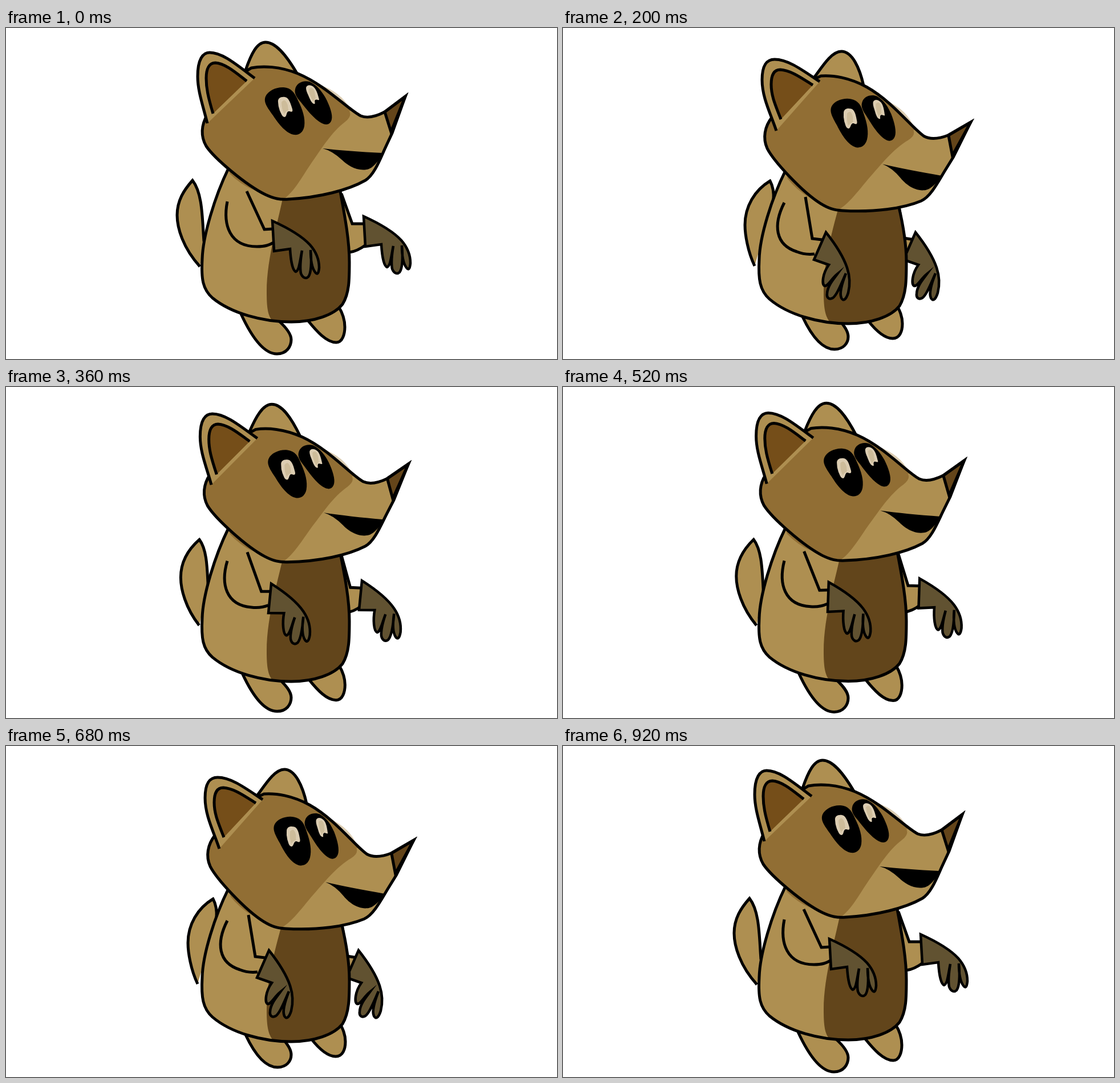
Recreate the animation shown at these times as an HTML page with a canvas. Size 966x580 px, loop 1 s.

```html
<!DOCTYPE html>
<html lang="en">
<head>
<meta charset="utf-8">
<title>Bobbing animal</title>
<style>
html, body { margin: 0; width: 100%; height: 100%; overflow: hidden; background: #fff; }
canvas { display: block; }
</style>
</head>
<body>
<canvas id="stage" width="966" height="580"></canvas>
<script>
const ctx = document.getElementById('stage').getContext('2d');
const FUR = '#ae8f51', SHADE = '#916e34', BELLY = '#62451b', EAR = '#754e19',
  HAND = '#615231', NOSE = '#64451a', GLINT = '#dccdb2', GLINT_DARK = '#cdbc9a';
const LINE = 5;

// Each pair holds the raised and the lowered shape of one part.
const parts = {
  tail: ['M340 418C310 385 300 350 300 328C300 302 312 284 327 267C345 290 344 335 347 374',
    'M336 417C324 392 319 362 319 345C319 313 336 284 363 268C368 277 370 287 369 302'],
  nearFoot: ['M412 501C430 540 452 571 475 571C492 571 500 558 500 546C500 534 488 522 478 513',
    'M420 506C436 540 455 563 476 563C492 563 500 552 500 541C500 532 494 524 488 516'],
  farFoot: ['M528 511C545 532 562 551 579 551C590 551 594 536 594 524C594 508 588 496 583 488',
    'M535 513C550 532 564 544 578 544C590 544 595 532 595 518C595 505 590 495 586 487'],
  body: ['M390 246C366 295 345 365 344 405C342 440 345 458 362 473C395 500 450 515 500 515C540 515 575 503 590 484C602 465 602 440 602 410C602 370 593 325 586 286',
    'M390 250C366 298 345 365 344 405C342 440 345 460 362 475C395 503 450 518 500 518C540 518 575 506 590 487C602 467 602 440 602 410C602 375 594 335 588 310'],
  belly: ['M487 288C480 330 457 400 457 462C457 490 459 505 468 514L620 530L620 270Z',
    'M487 300C478 335 457 400 457 464C457 492 460 508 470 517L620 530L620 270Z'],
  farArm: ['M588 290L607 343L630 343L631 380C620 388 612 392 602 393',
    'M588 304L597 368L616 371L608 390C600 398 590 400 580 400'],
  nearArm: ['M422 286L453 353L468 352M388 304C380 345 392 383 440 383C455 383 462 380 469 376',
    'M425 296L437 369L454 371M388 306C368 345 372 380 410 392C422 397 432 397 441 396'],
  hand: ['M467 338C500 353 522 368 533 380C547 396 549 410 549 420C548 432 545 432 542 428C536 420 534 404 534 389C536 410 535 430 530 436C526 440 520 438 517 430C515 420 517 402 519 390C515 410 514 425 508 427C502 425 499 405 498 387L470 391Z',
    'M461 358C480 382 492 402 498 420C504 438 503 452 500 464C496 477 491 479 488 473C484 464 489 448 496 430C487 450 480 468 473 473C466 477 462 472 463 465C464 452 473 442 481 431C470 440 465 452 459 452C453 450 455 430 466 415L440 406Z'],
  farEar: ['M420 74C430 45 440 25 455 25C472 25 490 45 511 81',
    'M441 86C453 70 470 41 488 41C507 41 520 70 527 101'],
  ear: ['M353 167C345 135 336 110 336 85C336 55 345 43 357 43C380 43 405 65 436 88',
    'M374 180C364 150 349 122 349 91C349 65 357 55 371 55C395 55 420 74 450 94'],
  earInner: ['M363 150C354 120 351 105 351 88C351 70 357 61 367 61C385 62 405 80 422 93',
    'M382 160C371 132 365 118 365 99C365 81 371 73 381 73C400 74 420 89 438 100']
};

const head = new Path2D('M353 152C342 170 341 190 351 207C365 228 420 275 455 292C470 299 480 301 495 300C550 297 600 284 630 267C645 258 655 232 664 212L677 184L700 120L664 147C645 157 632 158 622 154C600 143 560 100 512 80C480 67 450 66 430 70L420 76');
const mask = new Path2D('M640 120L602 146Q607 154 595 164C570 183 553 212 540 230C520 258 505 290 482 303L300 303L300 50L560 50Z');
const cheek = new Path2D('M548 99Q588 112 603 142Z');
const neck = new Path2D('M390 248L393 256Q410 273 434 284Z');
const eyes = new Path2D('M455 120C459 110 474 103 487 104C500 105 506 113 512 127C520 143 525 158 523 172C521 183 514 188 505 187C492 185 479 170 468 153C458 139 451 130 455 120ZM507 107C509 97 520 91 532 94C545 100 553 110 560 122C568 137 573 152 571 160C569 169 562 171 554 167C540 160 525 140 517 130C510 122 505 115 507 107Z');
const glints = new Path2D('M477 130C476 123 482 120 489 121C496 122 499 132 502 142C503 146 502 148 497 146C491 145 493 154 489 156C484 156 483 151 480 145Q477 137 477 130ZM526 105C527 99 535 99 540 104C545 109 547 118 549 125C549 128 545 124 542 126C540 129 543 132 541 133C536 133 533 125 530 118Q526 110 526 105Z');
const glintCores = new Path2D('M483 130Q489 121 494 135L495 144Q490 146 488 151Q483 143 483 130ZM531 107Q537 101 541 112L543 123Q540 125 539 129Q532 118 531 107Z');
const mouth = new Path2D('M555 211Q600 216 661 219C654 232 643 247 632 248C615 251 598 240 590 232Q572 215 555 211Z');
const nose = new Path2D('M664 147L700 120L675 182Z');

const NUM = /-?\d+/g;
function blend(name, p) {
  const [from, to] = parts[name];
  const ends = to.match(NUM);
  let i = 0;
  return new Path2D(from.replace(NUM, v => +v + (ends[i++] - v) * p));
}

function paint(path, fill, width = LINE) {
  if (fill) {
    ctx.fillStyle = fill;
    ctx.fill(path);
  }
  if (width) {
    ctx.lineWidth = width;
    ctx.stroke(path);
  }
}

function paintClipped(clip, path, fill) {
  ctx.save();
  ctx.clip(clip);
  paint(path, fill, 0);
  ctx.restore();
}

function turn(x, y, angle) {
  ctx.translate(x, y);
  ctx.rotate(angle);
  ctx.translate(-x, -y);
}

function drawBody(p) {
  for (const name of ['tail', 'nearFoot', 'farFoot', 'farArm']) paint(blend(name, p), FUR);
  const hand = blend('hand', p);
  ctx.save();
  ctx.translate(160 - 3 * p, -8 + 8 * p);
  paint(hand, HAND, 4.5);
  ctx.restore();

  const body = blend('body', p);
  paint(body, FUR, 0);
  paintClipped(body, blend('belly', p), BELLY);
  paint(body);
  paint(blend('nearArm', p));
  paint(hand, HAND, 4.5);
}

function drawHead(p) {
  paint(blend('farEar', p), FUR);
  ctx.save();
  turn(322, 268, 0.117 * p);
  paint(cheek, GLINT, 0);
  paint(neck, SHADE, 0);
  paint(head, FUR, 0);
  paintClipped(head, mask, SHADE);
  paint(eyes, '#000', 0);
  paint(glints, GLINT, 0);
  paint(glintCores, GLINT_DARK, 0);
  paint(mouth, '#000', 0);
  paint(nose, NOSE);
  paint(head);
  ctx.restore();
  paint(blend('ear', p), FUR);
  paint(blend('earInner', p), EAR);
}

// Two bobs per loop: five steps down, six steps up, one step at rest.
function pose(ms) {
  const step = Math.floor((ms % 1000) / 40);
  if (step === 24) return 0;
  const k = step % 12;
  return k <= 5 ? k / 5 : (11 - k) / 6;
}

let start;
function frame(now) {
  start ??= now;
  const p = pose(Math.max(0, now - start));
  ctx.fillStyle = '#fff';
  ctx.fillRect(0, 0, 966, 580);
  ctx.strokeStyle = '#000';
  ctx.lineJoin = 'miter';
  ctx.miterLimit = 10;
  drawBody(p);
  drawHead(p);
  requestAnimationFrame(frame);
}
requestAnimationFrame(frame);
</script>
</body>
</html>
```
